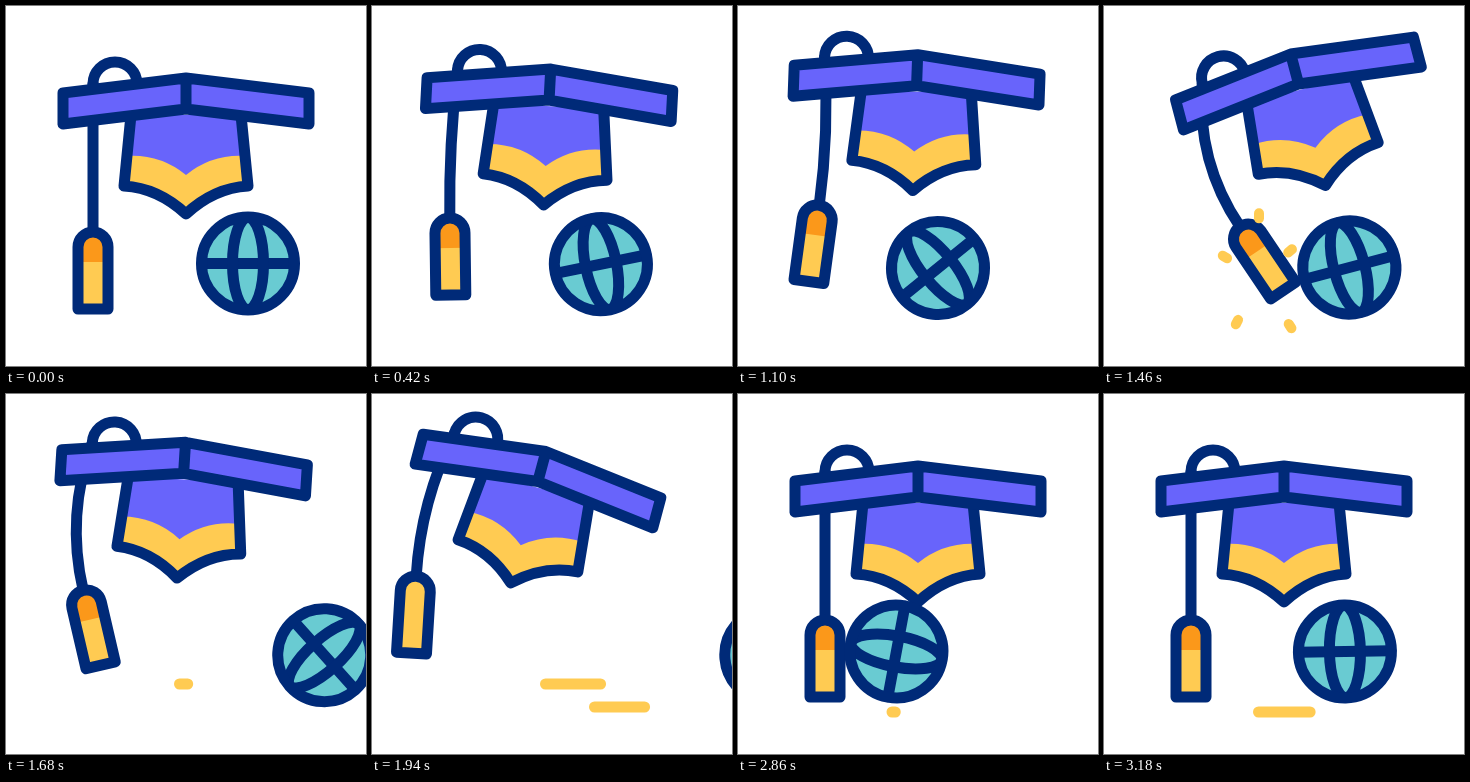
These frames come from a looping animation (360 px wide and 360 px high, 3.2 s). An HTML page:

```html
<!DOCTYPE html>
<html lang="en">
<head>
<meta charset="utf-8">
<title>Graduation cap and globe</title>
<style>
  html, body { margin: 0; width: 100%; height: 100%; overflow: hidden; background: #fff; }
  svg { display: block; width: 100vw; height: 100vh; }
  .line { fill: none; stroke: #002a78; stroke-width: 11; stroke-linecap: round; stroke-linejoin: round; }
  .purple { fill: #6864fb; }
  .yellow { fill: #ffcb52; }
  .teal { fill: #69cbd2; }
  .dash { fill: none; stroke: #ffcb52; stroke-width: 11; stroke-linecap: round; }
</style>
</head>
<body>
<svg viewBox="0 0 360 360">
  <g id="dashes"></g>
  <path id="cord" class="line"/>
  <!-- cap, centred on the middle of the board -->
  <g id="cap">
    <path class="line" d="M-93 -9a22 22 0 0 1 44 0"/>
    <path class="purple" d="M-55 22L-62 93Q-28 95 0 121Q28 95 62 93L55 22Z"/>
    <path class="yellow" d="M-59 63Q-26 61 0 82Q26 61 59 63L62 93Q28 95 0 121Q-28 95 -62 93Z"/>
    <path class="line" d="M-55 22L-62 93Q-28 95 0 121Q28 95 62 93L55 22"/>
    <path class="line purple" style="fill:#6864fb" d="M-123 0L0 -15L123 0V31L0 16L-123 31ZM0 -15V16"/>
  </g>
  <!-- tassel, hanging from its top centre -->
  <g id="tassel">
    <path class="yellow" d="M-15 77V15a15 15 0 0 1 30 0V77Z"/>
    <path id="knot" d="M-15 30V15a15 15 0 0 1 30 0V30Z"/>
    <path class="line" d="M-15 77V15a15 15 0 0 1 30 0V77Z"/>
  </g>
  <g id="globe">
    <circle class="teal" r="46.5"/>
    <path class="line" d="M-46 0H46"/>
    <ellipse class="line" rx="15.5" ry="46"/>
    <circle class="line" r="46.5"/>
  </g>
  <g id="sparks"></g>
</svg>
<script>
const LOOP = 3200, CORD = 148, HIT = 1340;
const $ = id => document.getElementById(id);

// time, cap angle, cap x, cap y, tassel angle
const capKeys = [
  [0, 0, 180, 87, 0],
  [220, 0, 180, 87, 0],
  [700, 10.5, 172.5, 63.5, -2],
  [860, 13.5, 170, 64, 4],
  [940, 13.2, 170.5, 64, 7],
  [1260, -12, 189, 63, 8],
  [1340, -14.6, 190.5, 62.5, -5],
  [1460, -14.8, 190.5, 62.5, -34],
  [1640, 0, 181, 63, -18],
  [1820, 13.5, 171.5, 66, 2],
  [1940, 15, 170, 72, 3.5],
  [2300, 3.5, 177.5, 87.5, 0.5],
  [2440, 0, 180, 87, 0],
  [LOOP, 0, 180, 87, 0]
];

// time, x, y, turn
const globeKeys = [
  [0, 242, 257.5, 0],
  [220, 242, 257.5, 0],
  [700, 202.5, 260.5, -36],
  [800, 200, 262, -39],
  [HIT, 200, 262, -39],
  [1460, 245, 261.5, -15],
  [1940, 399, 261, 130],
  [2180, 470, 261, 200]
];

// y, then time, tail x, head x
const trails = [
  [290, [[1640, 173.5, 173.5], [1940, 173.5, 228.5], [2140, 234, 234]]],
  [313, [[1700, 222.5, 222.5], [1940, 222.5, 272.5], [2180, 280, 280]]],
  [318, [[2840, 154, 154], [3180, 154.5, 206], [LOOP, 154.5, 208]]]
];

const sparkDirs = [[0, -62], [-34, -21], [31, -27], [-22, 44], [31, 48]];
const sparkKeys = [[HIT, 0.25, 2], [1460, 1, 5], [1560, 1.15, 0.1]];

// Smooth curve through the keys, without overshoot
function sample(keys, t) {
  const last = keys.length - 1;
  if (t <= keys[0][0]) return keys[0].slice(1);
  if (t >= keys[last][0]) return keys[last].slice(1);
  let i = 0;
  while (keys[i + 1][0] <= t) i++;
  const h = keys[i + 1][0] - keys[i][0], u = (t - keys[i][0]) / h;
  return keys[i].slice(1).map((p, n) => {
    const c = n + 1, q = keys[i + 1][c];
    const slope = k => (keys[k + 1][c] - keys[k][c]) / (keys[k + 1][0] - keys[k][0]);
    const tangent = k => {
      if (k === 0 || k === last) return slope(Math.min(k, last - 1));
      const a = slope(k - 1), b = slope(k);
      return a * b <= 0 ? 0 : 2 * a * b / (a + b);
    };
    const v = 1 - u;
    return p * v * v * (1 + 2 * u) + q * u * u * (3 - 2 * u)
      + h * u * v * (tangent(i) * v - tangent(i + 1) * u);
  });
}

function addPaths(parent, count) {
  return Array.from({ length: count }, () => {
    const path = document.createElementNS("http://www.w3.org/2000/svg", "path");
    path.setAttribute("class", "dash");
    return parent.appendChild(path);
  });
}

const dashPaths = addPaths($("dashes"), trails.length);
const sparkPaths = addPaths($("sparks"), sparkDirs.length);
const place = (el, x, y, turn) => el.setAttribute("transform", `translate(${x} ${y}) rotate(${turn})`);
const rad = deg => deg * Math.PI / 180;
// Point at a distance below (x, y) along a hanging line
const hang = (x, y, deg, len) => [x - Math.sin(rad(deg)) * len, y + Math.cos(rad(deg)) * len];

function drawCap(t) {
  const [turn, x, y, swing] = sample(capKeys, t);
  const c = Math.cos(rad(turn)), s = Math.sin(rad(turn));
  const top = [x - 93 * c + 9 * s, y - 93 * s - 9 * c];
  const bend = hang(...top, 2 * turn - swing, CORD / 2 / Math.cos(rad(turn - swing)));
  const end = hang(...top, turn, CORD);
  place($("cap"), x, y, turn);
  $("cord").setAttribute("d", `M${top}Q${bend} ${end}`);
  place($("tassel"), ...end, swing);
  $("knot").setAttribute("fill", t >= 1900 && t < 1980 ? "#ffcb52" : "#fb981a");
}

function drawGlobe(t) {
  if (t < 2180) return place($("globe"), ...sample(globeKeys, t));
  const left = 157 * (1 + Math.cos(Math.PI * (t - 2180) / 1040));
  place($("globe"), 242 - left, 257.5, -0.95 * left);
}

function drawDashes(t) {
  trails.forEach(([y, keys], i) => {
    const shown = t >= keys[0][0] && t < keys[2][0];
    const [tail, head] = sample(keys, t);
    dashPaths[i].setAttribute("d", shown ? `M${tail} ${y}H${head + 0.01}` : "");
  });
}

function drawSparks(t) {
  const shown = t >= HIT && t < 1560;
  const [reach, size] = sample(sparkKeys, t);
  sparkDirs.forEach(([dx, dy], i) => {
    const d = Math.hypot(dx, dy), ux = dx / d * size / 2, uy = dy / d * size / 2;
    const x = 155 + dx * reach, y = 272 + dy * reach;
    sparkPaths[i].setAttribute("d", shown ? `M${x - ux} ${y - uy}L${x + ux} ${y + uy}` : "");
    sparkPaths[i].style.strokeWidth = Math.min(10, size * 2 + 1);
  });
}

const start = performance.now();
function frame() {
  const t = (performance.now() - start) % LOOP;
  drawCap(t);
  drawGlobe(t);
  drawDashes(t);
  drawSparks(t);
  requestAnimationFrame(frame);
}
frame();
</script>
</body>
</html>
```
